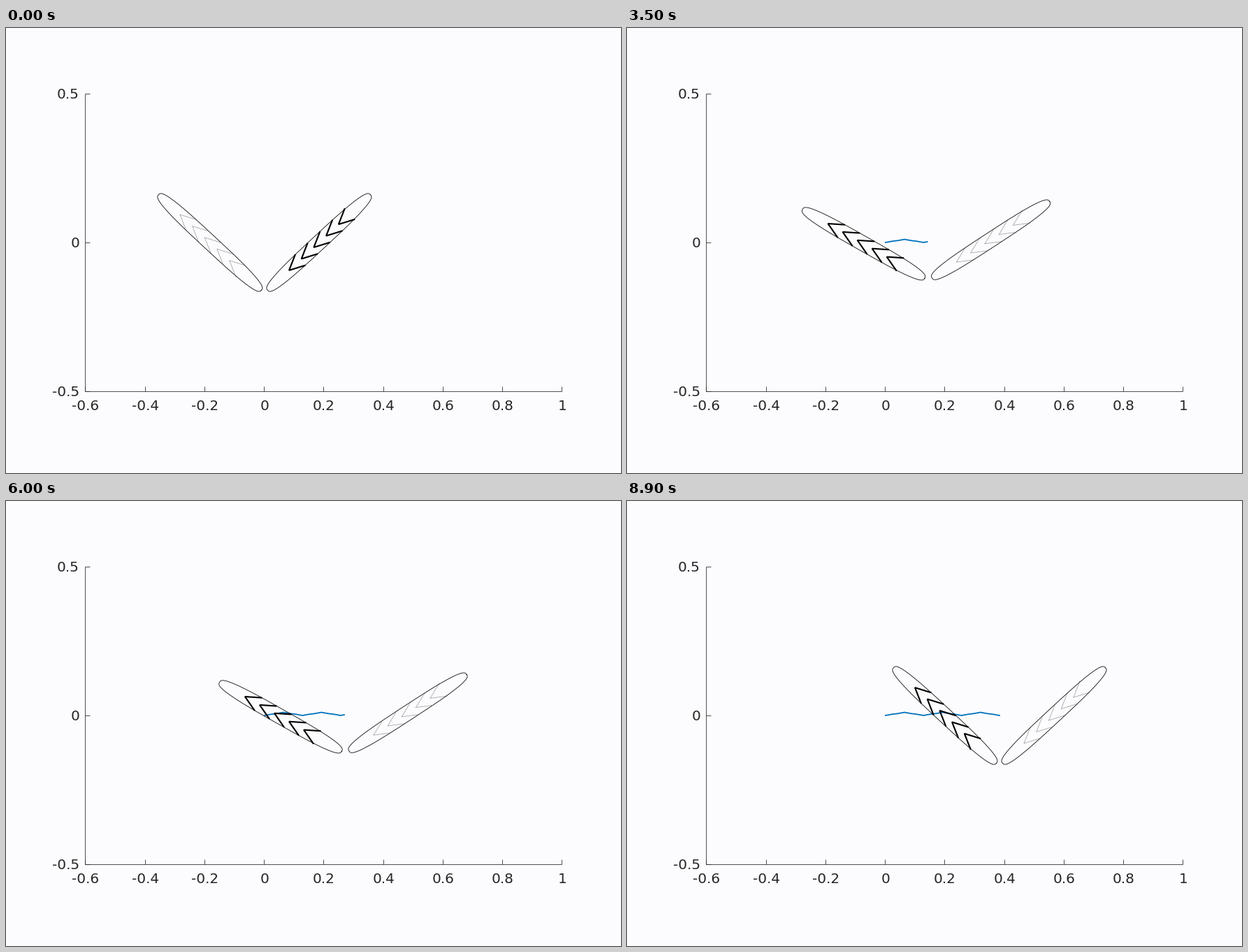
A matplotlib script for the animation above (9000 ms loop, 880 by 637 pixels).

```python
import numpy as np
import matplotlib.pyplot as plt
from matplotlib.animation import FuncAnimation

W, H, DPI = 880, 637, 100
FRAMES, INTERVAL = 90, 100
LAST = FRAMES - 1
PX = 72 / DPI                       # one pixel in points

# two-link crawler
HALF = 0.25                         # half length of a link
A, B, BLUNT = 0.2355, 0.025, 3      # superellipse semi-axes and exponent
SWING = 0.749                       # largest link angle
GRIP, SLIP, SIDE = 4.03, 1.0, 1.97  # drag along a link (thick, thin) and across it
CYCLES, RAMP = 3, 19.26             # gait cycles, frames of speeding up and slowing down
INK, BLUE, PAPER = '#262626', '#0072BD', '#fcfcfe'


def X(x):
    return 369.9 + 426.25 * np.asarray(x)


def Y(y):
    return 307 - 426.25 * np.asarray(y)


def solve_extension(steps=400):
    """Centre and tilt while the links open from SWING to flat, left link gripping."""
    angle = np.linspace(SWING, 0, steps + 1)
    step = SWING / steps
    total = GRIP + SLIP
    g, m = (GRIP - SLIP) / total, SIDE / total
    rows = [(0.0, 0.0, 0.0)]
    for a in angle[:-1] - step / 2:
        s, c = np.sin(a), np.cos(a)
        q = s * s + 2 * m * c * c
        vx = (g * s * c * 2 * m * c / q) / (c * c + 0.5 * m * s * s - (g * s * c) ** 2 / q)
        vy = (2 * m * c + vx * g * s * c) / q
        spin = 0.75 * s * vx
        ux, uy = vx - s * spin, vy - c
        x, y, t = rows[-1]
        k = HALF * step
        rows.append((x + k * (ux * np.cos(t) - uy * np.sin(t)),
                     y + k * (ux * np.sin(t) + uy * np.cos(t)),
                     t + step * spin))
    return angle[::-1], np.array(rows)[::-1]


ANGLES, PATH = solve_extension()
FLAT_X, FLAT_Y = PATH[0, :2]


def phase(i):
    rate = CYCLES / (LAST - 2 * RAMP + 4 * RAMP / np.pi)
    j = min(i, LAST - i)
    if j < RAMP:
        p = rate * 2 * RAMP / np.pi * (1 - np.cos(np.pi * j / (2 * RAMP)))
    else:
        p = rate * (j - RAMP + 2 * RAMP / np.pi)
    return round(p if j == i else CYCLES - p, 9)


def pose(i):
    """Centre x, y, tilt, link angle and whether the left link grips."""
    stroke, p = divmod(2 * phase(i), 1)
    bend = SWING * np.cos(np.pi * p)
    x, y, tilt = (np.interp(abs(bend), ANGLES, PATH[:, n]) for n in range(3))
    if p >= 0.5:
        x, y = 2 * FLAT_X - x, 2 * FLAT_Y - y
    if stroke % 2:
        y, tilt, bend = 2 * FLAT_Y - y, -tilt, -bend
    return x + stroke * 2 * FLAT_X, y, tilt, bend, 0 < i and p < 0.5


POSES = [pose(i) for i in range(FRAMES)]
TRAIL = np.array([p[:2] for p in POSES])


def bulge(v):
    return np.sign(v) * np.abs(v) ** (2 / BLUNT)


turn = np.linspace(0, 2 * np.pi, 241)
OUTLINE = np.array([A * bulge(np.cos(turn)), B * bulge(np.sin(turn))])
TIPS = -0.1375 + 0.0567 * np.arange(5)
CHEVRONS = np.hstack([[[t + 0.052, t, t + 0.052, np.nan], [B, 0, -B, np.nan]] for t in TIPS])

fig = plt.figure(figsize=(W / DPI, H / DPI), dpi=DPI, facecolor=PAPER)
ax = fig.add_axes([0, 0, 1, 1])
ax.set_xlim(0, W)
ax.set_ylim(H, 0)
ax.axis('off')


def line(color, width, **kw):
    return ax.plot([], [], color=color, lw=width * PX, **kw)[0]


def rule(x, y):
    ax.plot(x, y, color=INK, lw=0.8 * PX, snap=True, solid_capstyle='butt')


def label(x, y, value, ha):
    ax.text(x, y + 7, f'{value:g}', ha=ha, va='baseline', color=INK,
            family='DejaVu Sans', fontsize=20 * PX)


def column(x):
    return float(X(x)) - 0.7


left, bottom = column(-0.6), float(Y(-0.5))
rule([left, left], [float(Y(0.5)), bottom])
rule([left, column(1)], [bottom, bottom])
for n in range(-3, 6):
    x = column(n / 5)
    rule([x, x], [bottom, bottom - 7])
    label(x + 0.5, 539.6, n / 5, 'center')
for v in (-0.5, 0, 0.5):
    y = float(Y(v))
    rule([left, left + 7], [y, y])
    label(105, y, v, 'right')

trail = line(BLUE, 1.8, solid_joinstyle='round')
shells = [line('black', 0.8) for _ in range(2)]
thick = line('black', 2.1, solid_joinstyle='miter', solid_capstyle='butt')
thin = line('#4a4a4a', 0.8, dashes=(1.25, 1.25), dash_capstyle='butt')


def place(shape, cx, cy, angle):
    c, s = np.cos(angle), np.sin(angle)
    u, v = shape
    return X(cx + c * u - s * v), Y(cy + s * u + c * v)


def draw(i):
    x, y, tilt, bend, left_grips = POSES[i]
    reach = HALF * np.cos(bend)
    for side, shell in zip((-1, 1), shells):
        at = (x + side * reach * np.cos(tilt), y + side * reach * np.sin(tilt), tilt + side * bend)
        shell.set_data(*place(OUTLINE, *at))
        marks = thick if (side < 0) == left_grips else thin
        marks.set_data(*place(CHEVRONS, *at))
    trail.set_data(X(TRAIL[:i + 1, 0]), Y(TRAIL[:i + 1, 1]))
    return [trail, *shells, thick, thin]


anim = FuncAnimation(fig, draw, frames=FRAMES, interval=INTERVAL, repeat=True, repeat_delay=0)
plt.show()
```
